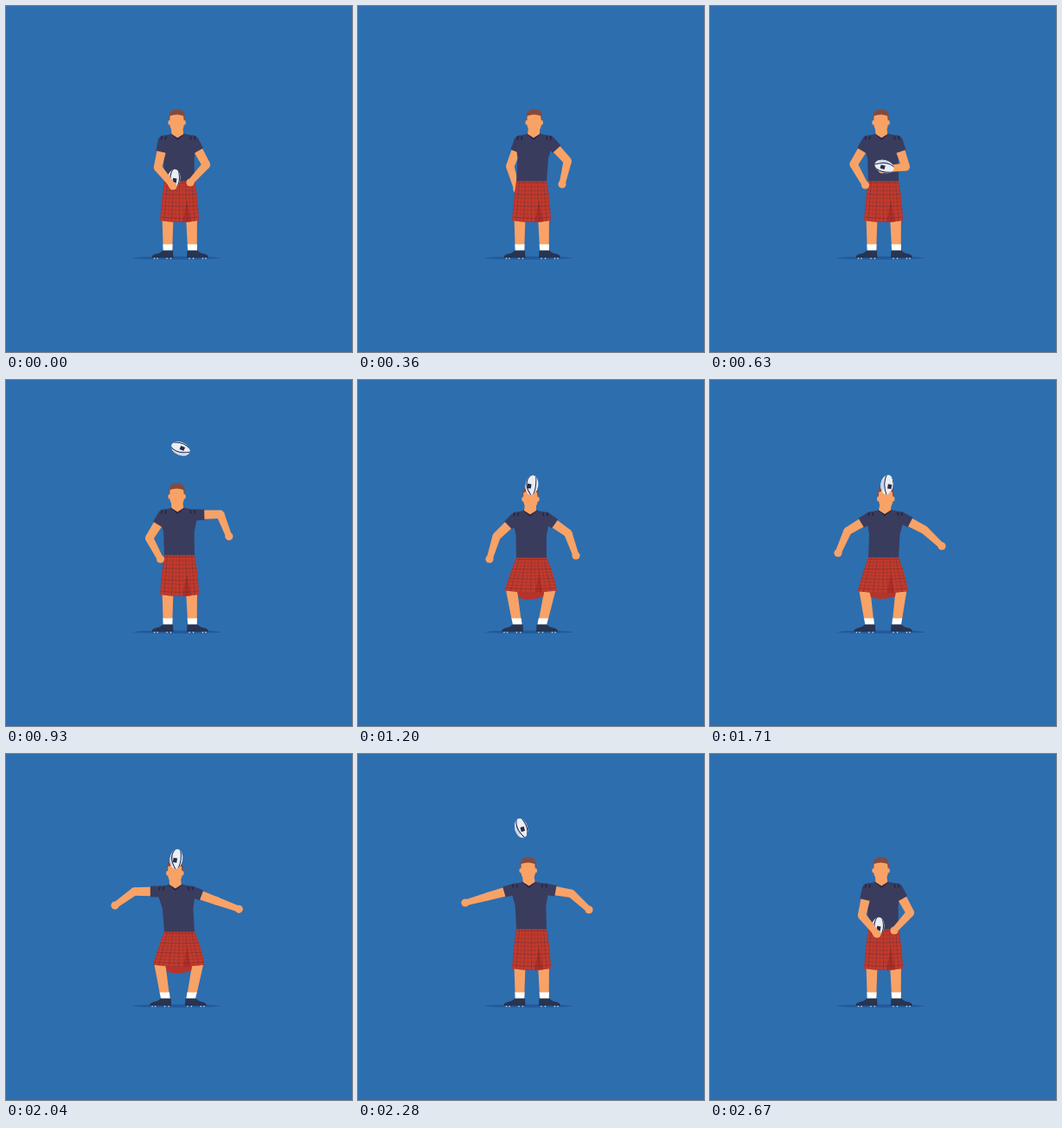
An HTML page with a canvas that plays this animation: 400x400 px, repeating every 3000 ms.

```html
<!DOCTYPE html>
<html lang="en">
<head>
<meta charset="utf-8">
<title>Ball tricks</title>
<style>
html, body { margin: 0; width: 100%; height: 100%; overflow: hidden; background: #2d6eaf; }
canvas { display: block; width: 400px; height: 400px; }
</style>
</head>
<body>
<canvas id="stage"></canvas>
<script>
const LOOP = 3000, STEP = 30;
const THROW = 690, LAND = 1062, NOD = 2160, CATCH = 2530;
const UPPER = 31.5, FORE = 27.5;
const SKIN = '#f9a266', NAVY = '#3a3c5d', DARK = '#20264a', RED = '#c43a2c', HAIR = '#854a3c';

const canvas = document.getElementById('stage');
const scale = Math.max(1, window.devicePixelRatio || 1);
canvas.width = canvas.height = 400 * scale;
const ctx = canvas.getContext('2d');
ctx.scale(scale, scale);

// hand paths: time, x, y
const leftPath = [
  [0, 193, 208], [150, 152, 207], [330, 184, 212], [540, 180, 207], [1000, 178, 207],
  [1200, 152, 207], [1710, 148, 200], [2280, 124, 172], [2560, 193, 208]
];
const rightPath = [
  [0, 213, 204], [220, 241, 205], [360, 236, 206], [420, 220, 208], [490, 238, 205],
  [630, 199, 189], [THROW, 200, 181], [800, 238, 163], [940, 258, 182],
  [1200, 252, 203], [1710, 268, 192], [2280, 267, 180], [2560, 213, 204]
];

const mix = (a, b, u) => a + (b - a) * u;
const part = (t, a, b) => Math.min(1, Math.max(0, (t - a) / (b - a)));
const ramp = (t, a, b) => { const u = part(t, a, b); return u * u * (3 - 2 * u); };
const pulse = (t, a, b) => Math.sin(Math.PI * part(t, a, b)) ** 2;
const fall = (t, peak, y) => y + .00195 * (t - peak) ** 2;

function slope(path, i, k) {
  const a = path[i - 1], b = path[i], c = path[i + 1];
  if (!a || !c) return 0;
  const m = (b[k] - a[k]) / (b[0] - a[0]), n = (c[k] - b[k]) / (c[0] - b[0]);
  return m * n <= 0 ? 0 : 2 * m * n / (m + n);
}

// smooth curve through the points, without overshoot
function follow(path, t) {
  const next = path.findIndex(p => p[0] > t);
  if (next < 0) return path[path.length - 1].slice(1);
  const i = next - 1, a = path[i], b = path[next], d = b[0] - a[0], u = (t - a[0]) / d;
  return [1, 2].map(k => mix(a[k], b[k], u * u * (3 - 2 * u))
    + d * u * (1 - u) * ((1 - u) * slope(path, i, k) - u * slope(path, next, k)));
}

function pose(t) {
  const crouch = ramp(t, 1030, 1200) * (1 - ramp(t, 2090, 2260));
  const beat = Math.cos(Math.PI * (t - 1200) / 510);
  const sway = crouch * (1 - beat * beat);
  const c = crouch * (.93 + .07 * beat);
  const x = -.7 - 2.5 * pulse(t, 0, 280) + 4.7 * pulse(t, 190, 530)
    + crouch * (2.2 - 1.5 * beat) - 5 * sway - .8 * pulse(t, NOD, 2500);
  const y = 3 * c;
  const [lx, ly] = follow(leftPath, t), [rx, ry] = follow(rightPath, t);
  return {
    x, y, c,
    head: [198.5 + 1.3 * x + c, 134 + y],
    left: [lx - 8 * sway, ly - 8 * sway],
    right: [rx + 2 * sway, ry - 5 * sway],
    feet: [-2.5 * c, -1.5 * c * (1 + beat)],
    patch: 1 - crouch * (1 + 3 * beat)
  };
}

function ballPlace(t, { left, right, head }) {
  if (t < 330 || t >= CATCH) return [left[0] + 1, left[1] - 8];
  if (t < THROW) return [right[0] + 2.5, right[1] - 3.5];
  if (t < LAND) return [mix(202.5, 201.5, part(t, THROW, LAND)), fall(t, 915, 79)];
  if (t < NOD) return [head[0] + 1.5, head[1] - 15.5];
  const u = part(t, NOD, CATCH);
  return [mix(203, 193, u) - 13 * Math.sin(Math.PI * u), fall(t, 2290, 85.5)];
}
const ballAngle = t => .15 + 1.7 * ramp(t, 240, 630)
  + (2 * Math.PI - 1.7) * ramp(t, THROW, LAND) - .5 * Math.sin(Math.PI * part(t, NOD, CATCH));

function poly(color, ...pts) {
  ctx.beginPath();
  pts.forEach(p => ctx.lineTo(p[0], p[1]));
  ctx.closePath();
  ctx.fillStyle = color;
  ctx.fill();
}
function oval(color, x, y, rx, ry = rx) {
  ctx.beginPath();
  ctx.ellipse(x, y, rx, ry, 0, 0, 7);
  ctx.fillStyle = color;
  ctx.fill();
}
function curve(color, width, [ax, ay], [qx, qy], [bx, by]) {
  ctx.beginPath();
  ctx.moveTo(ax, ay);
  ctx.quadraticCurveTo(qx, qy, bx, by);
  ctx.strokeStyle = color;
  ctx.lineWidth = width;
  ctx.stroke();
}
function taper(color, a, b, ra, rb) {
  const d = Math.hypot(b[0] - a[0], b[1] - a[1]) || 1;
  const nx = (a[1] - b[1]) / d, ny = (b[0] - a[0]) / d;
  poly(color, [a[0] + nx * ra, a[1] + ny * ra], [b[0] + nx * rb, b[1] + ny * rb],
    [b[0] - nx * rb, b[1] - ny * rb], [a[0] - nx * ra, a[1] - ny * ra]);
}

// the elbow bends outwards; side is -1 on the left, 1 on the right
function bend([sx, sy], [hx, hy], side) {
  const dx = hx - sx, dy = hy - sy, d = Math.hypot(dx, dy);
  const along = d > UPPER + FORE ? d * UPPER / (UPPER + FORE)
    : (d * d + UPPER ** 2 - FORE ** 2) / (2 * d);
  const out = side * Math.sqrt(Math.max(0, UPPER ** 2 - along ** 2));
  return [sx + (dx * along + dy * out) / d, sy + (dy * along - dx * out) / d];
}

function drawArm(side, p) {
  const shoulder = [200 + p.x + side * 17, 156 + p.y];
  const hand = side < 0 ? p.left : p.right;
  const elbow = bend(shoulder, hand, side);
  const cuff = shoulder.map((v, i) => mix(v, elbow[i], 13 / UPPER));
  taper(SKIN, shoulder, elbow, 5.6, 4.7);
  oval(SKIN, ...elbow, 4.7);
  taper(SKIN, elbow, hand, 4.7, 3.5);
  oval(SKIN, ...hand, 4.6);
  oval(NAVY, ...shoulder, 6.5);
  taper(NAVY, shoulder, cuff, 6.5, 6.3);
}

function drawLeg(side, foot, c) {
  const x = (side < 0 ? 187 : 215.5) + foot;
  const top = (side < 0 ? 187 : 214.5) + (side * 8.5 - 1) * c;
  const sock = mix(top, x, .8);
  poly(SKIN, [top - 6.5, 243], [top + 6.5, 243], [sock + 5.4, 277], [sock - 5.4, 277]);
  poly('#fff', [sock - 5.6, 275.5], [sock + 5.6, 275.5], [x + 5.3, 284], [x - 5.3, 284]);
  ctx.beginPath();
  ctx.moveTo(x - side * 6, 282.5);
  ctx.lineTo(x + side * 5.5, 282.5);
  ctx.quadraticCurveTo(x + side * 9, 286, x + side * 15, 287);
  ctx.quadraticCurveTo(x + side * 18.5, 288, x + side * 18.5, 291);
  ctx.lineTo(x - side * 6.5, 291);
  ctx.fillStyle = '#283451';
  ctx.fill();
  [-3.5, 1, 12, 15.5].forEach(d => oval('#dfe7f2', x + side * d, 291.8, .8));
}

function drawKilt(c) {
  const top = 202.5 + 3 * c, end = 248 - 4.5 * c;
  const left = 178 - 8.5 * c, right = 223 + 7 * c;
  if (c > .02) {
    ctx.beginPath();
    ctx.moveTo(183, 240);
    ctx.lineTo(216, 240);
    ctx.lineTo(214, end + 7 * c);
    ctx.quadraticCurveTo(196, end + 13 * c, 186, end + 8 * c);
    ctx.fillStyle = '#b5332b';
    ctx.fill();
  }
  ctx.save();
  ctx.beginPath();
  ctx.moveTo(183, top);
  ctx.lineTo(218, top);
  ctx.quadraticCurveTo(222 + 4 * c, 222, right, end);
  ctx.quadraticCurveTo(200.5, end + 4, left, end);
  ctx.quadraticCurveTo(180 - 4 * c, 222, 183, top);
  ctx.fillStyle = RED;
  ctx.fill();
  ctx.clip();
  poly('rgba(165,30,28,.5)', [209, 224], [204, 250], [214, 250]);
  for (let i = 0; i <= 10; i++) {
    const u = i / 10, y = mix(top + 2, end, u);
    const a = [mix(183, 218, u), top], b = [mix(left, right, u), end + 4];
    curve(`rgba(70,45,60,${i % 2 ? .5 : .28})`, .7, a, a, b);
    curve(`rgba(70,45,60,${i % 3 ? .28 : .55})`, .7,
      [left - 2, y], [200.5, y + 4 * u], [right + 2, y]);
  }
  ctx.restore();
}

function drawShirt({ x, y, c }) {
  const m = 200 + x, s = 149 + y, waist = 203 + 3 * c;
  poly(NAVY, [m - 8, s - 1], [m + 8, s - 1], [m + 18, s + 1], [m + 22, s + 8],
    [mix(m + 18, 218, .5), s + 27], [218, waist], [183, waist],
    [mix(m - 18, 183, .5), s + 27], [m - 22, s + 8], [m - 18, s + 1]);
}
function drawTrim({ x, y }) {
  [-19, -14.5, 14, 18.5].forEach(d => {
    const a = [200 + x + d, 150.5 + y];
    curve(DARK, 1.5, a, a, [200 + x + d * 1.04, 154.5 + y]);
  });
}

function drawHead({ head: [x, y], x: lean }) {
  const m = 199 + lean;
  poly(DARK, [m - 8.5, y + 13.5], [m + 8.5, y + 13.5], [m, y + 21]);
  poly(SKIN, [x - 6.5, y + 6], [x + 6.5, y + 6], [m + 7, y + 14], [m, y + 18.5], [m - 7, y + 14]);
  ctx.beginPath();
  ctx.moveTo(x - 9, y + 1);
  ctx.lineTo(x - 9, y - 7);
  ctx.bezierCurveTo(x - 9, y - 17.5, x + 9, y - 17.5, x + 9, y - 7);
  ctx.lineTo(x + 9, y + 1);
  ctx.fillStyle = HAIR;
  ctx.fill();
  [-8.6, 8.6].forEach(d => oval(SKIN, x + d, y + .8, 1.7, 2.8));
  ctx.beginPath();
  ctx.moveTo(x - 8, y - 7);
  ctx.quadraticCurveTo(x, y - 10, x + 7.5, y - 7);
  ctx.lineTo(x + 8.5, y + 2);
  ctx.quadraticCurveTo(x + 7.5, y + 10, x + 3, y + 12);
  ctx.lineTo(x - 3, y + 12);
  ctx.quadraticCurveTo(x - 7.5, y + 10, x - 8.5, y + 2);
  ctx.fillStyle = SKIN;
  ctx.fill();
}

function drawBall([x, y], angle, patch) {
  ctx.save();
  ctx.translate(x, y);
  ctx.rotate(angle);
  oval('#e9edf4', 0, 0, 7.4, 11.4);
  ctx.clip();
  oval('#cfd6e4', -7, 3, 4, 10);
  curve(DARK, 1, [-2, -12], [-9 + patch, -2], [1, 12]);
  curve(DARK, 1, [3, -12], [9 + patch, 2], [3, 12]);
  ctx.fillStyle = '#252c46';
  ctx.fillRect(patch - 2, -1, 4.4, 5.2);
  ctx.restore();
}

function draw(t) {
  const p = pose(t);
  const within = (a, b) => t >= a && t < b;
  const leftBehind = within(180, 480), rightBehind = within(370, 440);
  const ballBehind = within(210, 440), ballHidden = within(290, 410);
  const ball = () => drawBall(ballPlace(t, p), ballAngle(t), p.patch);

  ctx.fillStyle = '#2d6eaf';
  ctx.fillRect(0, 0, 400, 400);
  oval('#22599a', 197.5, 291.3, 51, 1.7);
  drawLeg(-1, p.feet[0], p.c);
  drawLeg(1, p.feet[1], p.c);
  if (ballBehind && !ballHidden) ball();
  if (leftBehind) drawArm(-1, p);
  if (rightBehind) drawArm(1, p);
  drawShirt(p);
  drawKilt(p.c);
  drawHead(p);
  if (!rightBehind) drawArm(1, p);
  if (!ballBehind) ball();
  if (!leftBehind) drawArm(-1, p);
  drawTrim(p);
}

const start = performance.now();
function tick() {
  const t = (performance.now() - start) % LOOP;
  draw(Math.floor(t / STEP) * STEP);
  requestAnimationFrame(tick);
}
tick();
</script>
</body>
</html>
```
